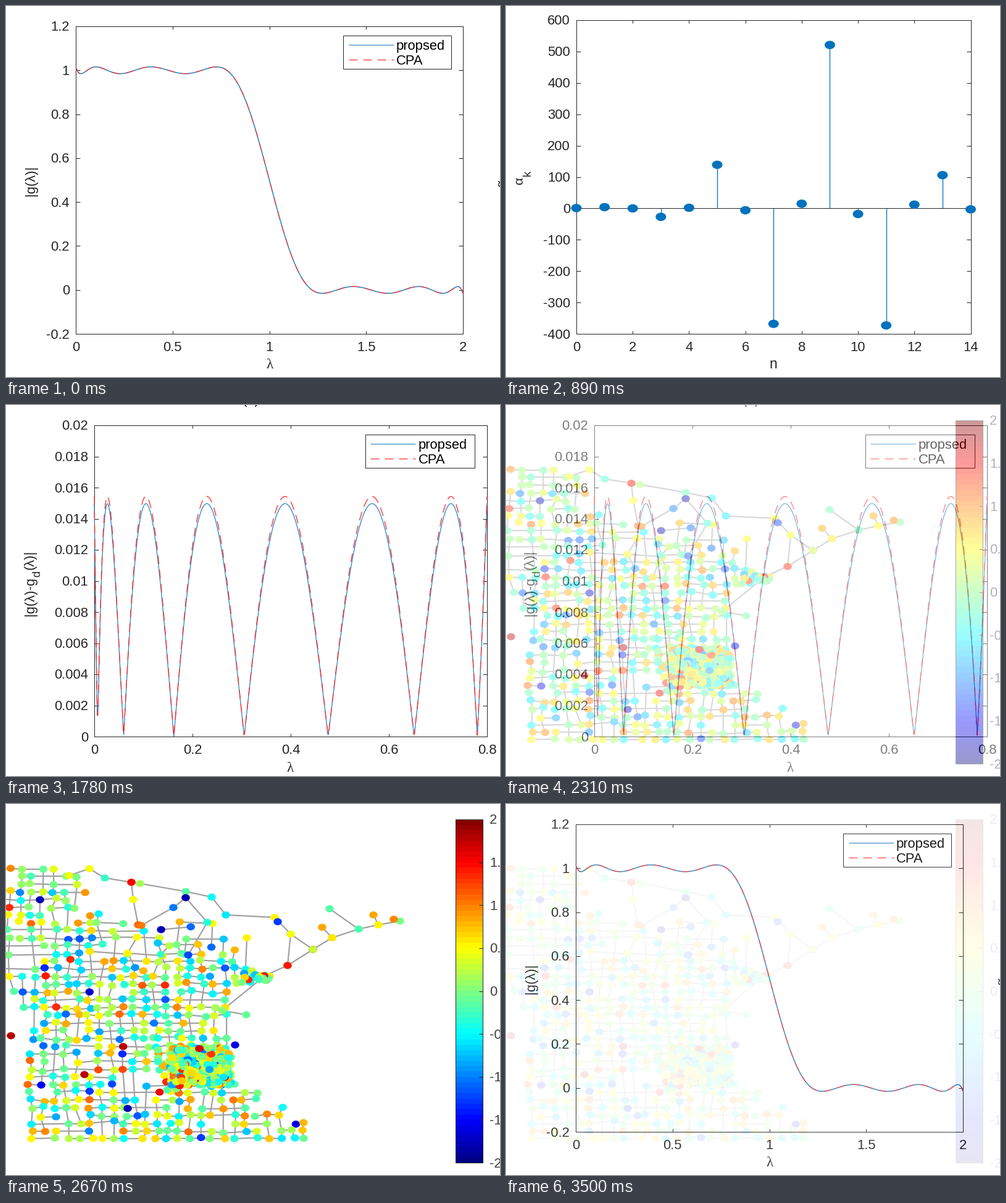
A matplotlib script that plays this animation: 800x602 px, repeating every 3560 ms.

```python
import numpy as np
import matplotlib.pyplot as plt
from matplotlib.animation import FuncAnimation
from matplotlib.collections import EllipseCollection, LineCollection
from matplotlib.patches import Rectangle

W, H, DPI = 800, 602, 64
PT = 72 / DPI
HOLD, STEP, STEPS, TICK = 350, 60, 9, 10
SCENE = HOLD + STEP * STEPS

INK = "#262626"
BLUE = "#0072bd"
LINE_BLUE = "#2a88c8"
LINE_RED = "#ff2a2a"
DASH = (14, 9)

plt.rcParams["font.family"] = ["Liberation Sans", "DejaVu Sans"]
plt.rcParams["lines.scale_dashes"] = False
fig = plt.figure(figsize=(W / DPI, H / DPI), dpi=DPI, facecolor="white")


def stage():
    """Axes whose data units are pixels, y pointing down."""
    fig.clear()
    ax = fig.add_axes([0, 0, 1, 1])
    ax.set_xlim(0, W)
    ax.set_ylim(H, 0)
    ax.axis("off")
    return ax


def put(ax, x, y, s, ha="center", size=22, rot=0, color=INK, font=None):
    ax.text(x, y, s, ha=ha, va="baseline", rotation=rot, rotation_mode="anchor",
            fontsize=size * PT, color=color, family=font, zorder=8)


def line(ax, x, y, color=INK, width=1.0, dash=None, z=2):
    style = (0, tuple(d * PT for d in dash)) if dash else "-"
    ax.plot(x, y, color=color, lw=width * PT, ls=style, zorder=z,
            solid_capstyle="butt", dash_capstyle="butt")


def dots(ax, x, y, w, h, color, z=4):
    n = len(x)
    ax.add_collection(EllipseCollection(
        np.full(n, w), np.full(n, h), np.zeros(n), units="xy",
        offsets=np.column_stack([x, y]), transOffset=ax.transData,
        facecolors=color, edgecolors="none", zorder=z))


def box(ax, x0, y0, x1, y1, fill="none", z=3):
    ax.add_patch(Rectangle((x0, y0), x1 - x0, y1 - y0, fc=fill, ec=INK,
                           lw=PT, zorder=z))


def chart(ax, rect, xlim, ylim, xstep, ystep, label_y):
    """Boxed axes with inward ticks; returns the two scales."""
    x0, y0, x1, y1 = rect

    def sx(v):
        return x0 + (np.asarray(v) - xlim[0]) / (xlim[1] - xlim[0]) * (x1 - x0)

    def sy(v):
        return y1 - (np.asarray(v) - ylim[0]) / (ylim[1] - ylim[0]) * (y1 - y0)

    def ticks(lim, step):
        count = round((lim[1] - lim[0]) / step) + 1
        return [round(lim[0] + i * step, 6) for i in range(count)]

    box(ax, *rect)
    for v in ticks(xlim, xstep):
        x = sx(v)
        line(ax, [x, x], [y1, y1 - 5])
        line(ax, [x, x], [y0, y0 + 5])
        put(ax, x, label_y, f"{v:g}")
    for v in ticks(ylim, ystep):
        y = sy(v)
        line(ax, [x0, x0 + 7], [y, y])
        line(ax, [x1, x1 - 7], [y, y])
        put(ax, x0 - 10, y + 7.5, f"{v:g}", ha="right")
    return sx, sy


def legend(ax, x0, x1):
    box(ax, x0, 48, x1, 102, fill="white", z=5)
    left = x0 + 8.5
    line(ax, [left, left + 73], [63, 63], LINE_BLUE, 1.2, z=6)
    line(ax, [left, left + 73], [87, 87], LINE_RED, 1.2, DASH, z=6)
    put(ax, x0 + 86, 71, "propsed", ha="left", color="black")
    put(ax, x0 + 86, 95, "CPA", ha="left", color="black")


# ---- low-pass response: odd minimax polynomial around the cutoff ----

ORDERS = np.arange(1, 14, 2)


def basis(x):
    return np.cos(np.outer(np.arccos(np.clip(x, -1, 1)), ORDERS))


def minimax(edge=0.2, rounds=15):
    """Remez exchange for a constant 0.5 on [edge, 1]."""
    x = np.linspace(edge, 1, 4001)
    n = len(ORDERS) + 1
    signs = (-1.0) ** np.arange(n)
    ref = (1 + edge) / 2 - (1 - edge) / 2 * np.cos(np.pi * np.arange(n) / (n - 1))
    for _ in range(rounds):
        sol = np.linalg.solve(np.column_stack([basis(ref), signs]), np.full(n, 0.5))
        slope = np.diff(basis(x) @ sol[:-1])
        turns = np.where(slope[1:] * slope[:-1] < 0)[0] + 1
        if len(turns) != n - 2:
            break
        ref = np.concatenate([[edge], x[turns], [1]])
    return sol[:-1], abs(sol[-1])


COEF, RIPPLE = minimax()


def gain(lam):
    return 0.5 + basis(1 - lam) @ COEF


def response():
    ax = stage()
    sx, sy = chart(ax, (113, 33, 740, 532), (0, 2), (-0.2, 1.2), 0.5, 0.2, 560)
    lam = np.linspace(0, 2, 1200)
    x, y = sx(lam), sy(gain(lam))
    line(ax, x, y, LINE_BLUE, 1.6, z=4)
    line(ax, x, y, LINE_RED, 1.1, DASH, z=4)
    legend(ax, 546, 720.5)
    put(ax, 427, 588, "λ", size=23, font="Liberation Serif")
    put(ax, 46, 308, "|g(λ)|", ha="left", rot=90)
    put(ax, 808, 294, "α", ha="left", size=20, rot=90)


def stems():
    ax = stage()
    sx, sy = chart(ax, (114, 23, 752.5, 532), (0, 14), (-400, 600), 2, 100, 560)
    values = [1, 4, 0, -27, 2, 139, -6, -368, 15, 521, -18, -373, 12, 106, -3]
    x, y = sx(np.arange(15)), sy(values)
    zero = sy(0)
    for a, b in zip(x, y):
        line(ax, [a, a], [zero, b], BLUE, 1.3, z=3)
    line(ax, [x[0], x[-1]], [zero, zero], z=3)
    dots(ax, x, y, 17, 13.5, BLUE)
    put(ax, 433, 588, "n", size=23)
    put(ax, 27, 290, "α", ha="left", size=21, rot=90)
    put(ax, 40, 276, "k", ha="left", size=19, rot=90)


def deviation():
    ax = stage()
    sx, sy = chart(ax, (143, 33, 779, 538), (0, 0.8), (0, 0.02), 0.2, 0.002, 566)
    lam = np.linspace(0, 0.8, 801)
    err = np.abs(gain(lam) - 1) / RIPPLE
    err = np.where(lam < 0.02, np.maximum(err, 0.09), err)
    line(ax, sx(lam), sy(0.01497 * err), LINE_BLUE, 1.3, z=4)
    line(ax, sx(lam), sy(0.01543 * err), LINE_RED, 1.3, DASH, z=4)
    legend(ax, 581.5, 759)
    put(ax, 460, 595, "λ", size=23, font="Liberation Serif")
    put(ax, 45, 342, "|g(λ)-g", ha="left", rot=90)
    put(ax, 55, 279, "d", ha="left", size=18, rot=90)
    put(ax, 45, 267, "(λ)|", ha="left", rot=90)
    put(ax, 397, -2, "(b)", size=23)


# ---- road graph ----

BORDER = [(102, 116), (135, 105), (160, 120), (203, 127), (217, 129), (291, 142),
          (333, 151), (356, 180), (435, 184), (461, 211), (497, 236)]
SHORE = [(350, 335), (420, 278), (456, 262), (497, 236), (528, 217), (571, 203),
         (603, 196), (638, 190)]
SPURS = [[(461, 211), (456, 262)], [(571, 203), (524, 170)],
         [(603, 196), (595, 180)], [(528, 217), (512, 200)],
         [(350, 335), (389, 342)], [(203, 127), (206, 155), (214, 196)],
         [(219, 197), (271, 168), (291, 152), (326, 192), (295, 245)]]
# x, y, value of the few strongest nodes
PEAKS = [(203, 127, 1.5), (291, 152, -1.8), (440, 191, -1.3), (628, 187, 0.95),
         (8, 376, 1.75), (127, 439, 1.8), (197, 494, -1.8), (371, 391, -1.6)]
# y, western and eastern limit of the town grid
OUTLINE = np.array([(105, -12, 110), (178, -12, 150), (188, -12, 405),
                    (290, -12, 385), (330, 28, 350), (380, 36, 350),
                    (395, 40, 365), (452, 40, 368), (480, 40, 435),
                    (515, 40, 492), (545, 40, 492)]).T


def jet(v):
    """Blue-cyan-yellow-red ramp in 64 levels for v in 0..1."""
    level = (np.floor(np.clip(v, 0, 0.999) * 64) + 0.5) / 64
    return np.stack([np.clip(1.5 - np.abs(4 * level - k), 0, 1) for k in (3, 2, 1)], -1)


def lattice(rng):
    """Jittered town grid and the roads joining neighbours."""
    nodes, roads = {}, []
    for r, y in enumerate(np.linspace(105, 543, 36)):
        west, east = (np.interp(y, OUTLINE[0], side) for side in OUTLINE[1:])
        for c, x in enumerate(np.arange(-12, 500, 18.3)):
            wild = x > 150 and y < 250
            keep = 0.38 if wild else 0.55 if y < 180 else 0.7
            if west - 4 <= x <= east + 4 and rng.random() < keep:
                spread = 5 if wild else 2.5
                px = x + 3 * np.sin(y / 45 + x / 60) + rng.normal(0, spread)
                nodes[r, c] = (px, min(y + rng.normal(0, spread / 2), 543))
    for (r, c), p in nodes.items():
        for dr, dc in ((0, 1), (1, 0)):
            near = [nodes[q] for k in range(1, 5)
                    if (q := (r + dr * k, c + dc * k)) in nodes]
            if near and rng.random() < 0.75:
                roads.append([p, near[0]])
    return list(nodes.values()), roads


def road_map():
    ax = stage()
    rng = np.random.default_rng(11)
    towns, roads = lattice(rng)
    for path in [BORDER, SHORE] + SPURS:
        towns += path
        roads += [list(pair) for pair in zip(path, path[1:])]
    city = rng.uniform((266, 395), (362, 458), (320, 2))
    suburb = np.clip(rng.normal((300, 428), (34, 22), (70, 2)), (246, 380), (364, 464))
    port = rng.normal((404, 282), (10, 4), (28, 2))
    strong = np.array(PEAKS)
    pts = np.vstack([towns, suburb, city, port, strong[:, :2]])
    vals = rng.normal(0.06, 0.62, len(pts))
    vals[-len(strong):] = strong[:, 2]

    ax.add_collection(LineCollection(roads, colors="#a0a0a0", linewidths=2.2 * PT, zorder=2))
    dots(ax, pts[:, 0], pts[:, 1], 13.5, 11.5, jet((vals + 2) / 4))

    top, bottom = 25, 582
    ax.imshow(jet(np.linspace(1, 0, 64))[:, None], aspect="auto",
              extent=(728, 772, bottom, top), interpolation="nearest", zorder=2)
    ax.set_xlim(0, W)
    ax.set_ylim(H, 0)
    box(ax, 728, top, 772, bottom)
    for v in np.arange(2, -2.1, -0.5):
        y = top + (2 - v) / 4 * (bottom - top)
        line(ax, [766, 772], [y, y], z=4)
        put(ax, 783, y + 7.5, f"{v:g}", ha="left", color="#404040")


def render(draw):
    draw()
    fig.canvas.draw()
    return np.array(fig.canvas.buffer_rgba())[..., :3].astype(np.float32)


scenes = [render(draw) for draw in (response, stems, deviation, road_map)]

view = stage()
picture = view.imshow(scenes[0].astype(np.uint8), extent=(0, W, H, 0),
                      aspect="auto", interpolation="nearest")


def update(i):
    index, t = divmod(i * TICK, SCENE)
    mix = 0 if t < HOLD else ((t - HOLD) // STEP + 1) / (STEPS + 1)
    here, following = scenes[index], scenes[(index + 1) % len(scenes)]
    blend = here + (following - here) * mix
    picture.set_data(np.rint(blend).astype(np.uint8))
    return [picture]


anim = FuncAnimation(fig, update, frames=len(scenes) * SCENE // TICK,
                     interval=TICK, repeat=True, repeat_delay=0)
plt.show()
```
